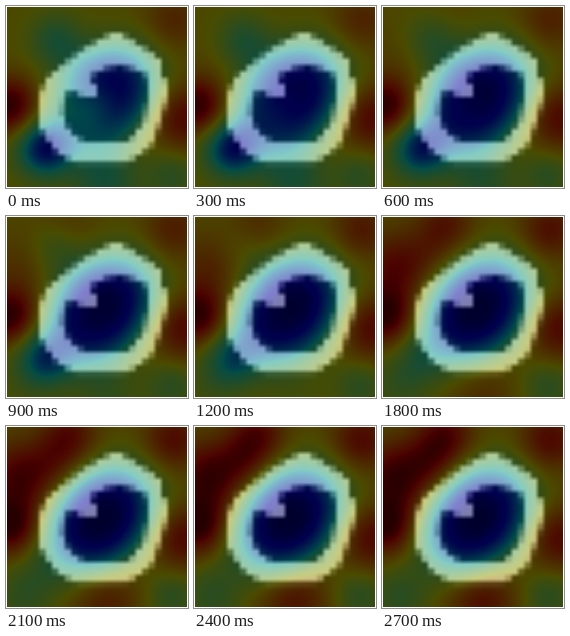
A matplotlib script for the animation above (3000 ms loop, 182x182 px).

```python
import numpy as np
import matplotlib.pyplot as plt
from matplotlib.animation import FuncAnimation
from matplotlib.path import Path

STAGE, SIZE, CELLS, FRAMES = 182, 180, 28, 10

OUTER = [(110, 25), (136, 41), (155, 54), (155, 71), (162, 76), (161, 90),
         (154, 116), (145, 140), (122, 156), (68, 156), (50, 145), (40, 131),
         (33, 118), (33, 92), (41, 72), (76, 44)]
INNER = [(82, 71), (98, 62), (115, 59), (139, 66), (144, 84), (138, 116),
         (122, 137), (79, 137), (62, 124), (56, 108), (58, 87), (69, 85),
         (76, 90), (91, 90), (92, 83)]


def inside(outline, points):
    return Path(outline + outline[:1]).contains_points(points)


def digit_mask():
    """Rasterise the ring on the coarse cell grid, then enlarge it."""
    sub = 6
    axis = (np.arange(CELLS * sub) + .5) * SIZE / (CELLS * sub) + 1
    points = np.stack(np.meshgrid(axis, axis), -1).reshape(-1, 2)
    fine = inside(OUTER, points) & ~inside(INNER, points)
    cells = fine.reshape(CELLS, sub, CELLS, sub).mean((1, 3))
    cells = np.clip(cells * 1.3 - .1, 0, 1)

    pos = np.clip((np.arange(SIZE) + .5) * CELLS / SIZE - .5, 0, CELLS - 1.001)
    low = pos.astype(int)
    mix = np.clip((pos - low - .5) * 1.4 + .5, 0, 1)
    rows = cells[low] * (1 - mix)[:, None] + cells[low + 1] * mix[:, None]
    return rows[:, low] * (1 - mix) + rows[:, low + 1] * mix


MASK = digit_mask()
X, Y = np.meshgrid(np.arange(SIZE) + 1.5, np.arange(SIZE) + 1.5)


def bump(x, y, radius):
    return np.exp(-((X - x) ** 2 + (Y - y) ** 2) / radius ** 2)


def cold_well(x, y, length, width):
    """Cold hollow, stretched along the rising diagonal, in a warm plain."""
    along = (X - x - Y + y) / np.sqrt(2) / length
    across = (X - x + Y - y) / np.sqrt(2) / width
    return .02 + .64 * (1 - np.exp(-(along ** 2 + across ** 2) ** 1.4))


def heat(step):
    t = step / (FRAMES - 1)
    ease = t * t * (3 - 2 * t)
    early, late = 1 - ease, ease
    field = cold_well(95, 93, 60, 46)
    field += .30 * np.exp(-step / 1.2) * bump(80, 106, 35)    # fading glow
    field += .32 * bump(4, 100, 28)                           # left edge
    field += .30 * late * bump(14, 52, 36)
    field += .22 * bump(178, 112, 32)                         # right edge
    field += (.12 + .10 * late) * bump(168, 14, 30)
    field += (.14 * late - .20 * early) * bump(50, 34, 26)    # top
    field += .22 * late * bump(64, 8, 28)
    field -= .45 * early * bump(38, 144, 27)                  # lower left
    field -= .14 * late * bump(18, 170, 28)
    field += (.20 * late - .22 * early) * bump(100, 174, 34)  # bottom
    field -= .14 * bump(166, 170, 24)
    return np.clip(field, 0, 1)


def picture(step):
    colours = plt.cm.jet(heat(step))[..., :3]
    frame = np.ones((STAGE, STAGE, 3))
    frame[1:-1, 1:-1] = .3 * colours + .5 * MASK[..., None]
    return frame


fig = plt.figure(figsize=(2, 2), dpi=STAGE / 2)
ax = fig.add_axes([0, 0, 1, 1])
ax.axis("off")
image = ax.imshow(picture(0), interpolation="nearest", aspect="auto")


def update(step):
    image.set_data(picture(step))
    return [image]


anim = FuncAnimation(fig, update, frames=FRAMES, interval=300,
                     repeat=True, repeat_delay=0)
plt.show()
```
